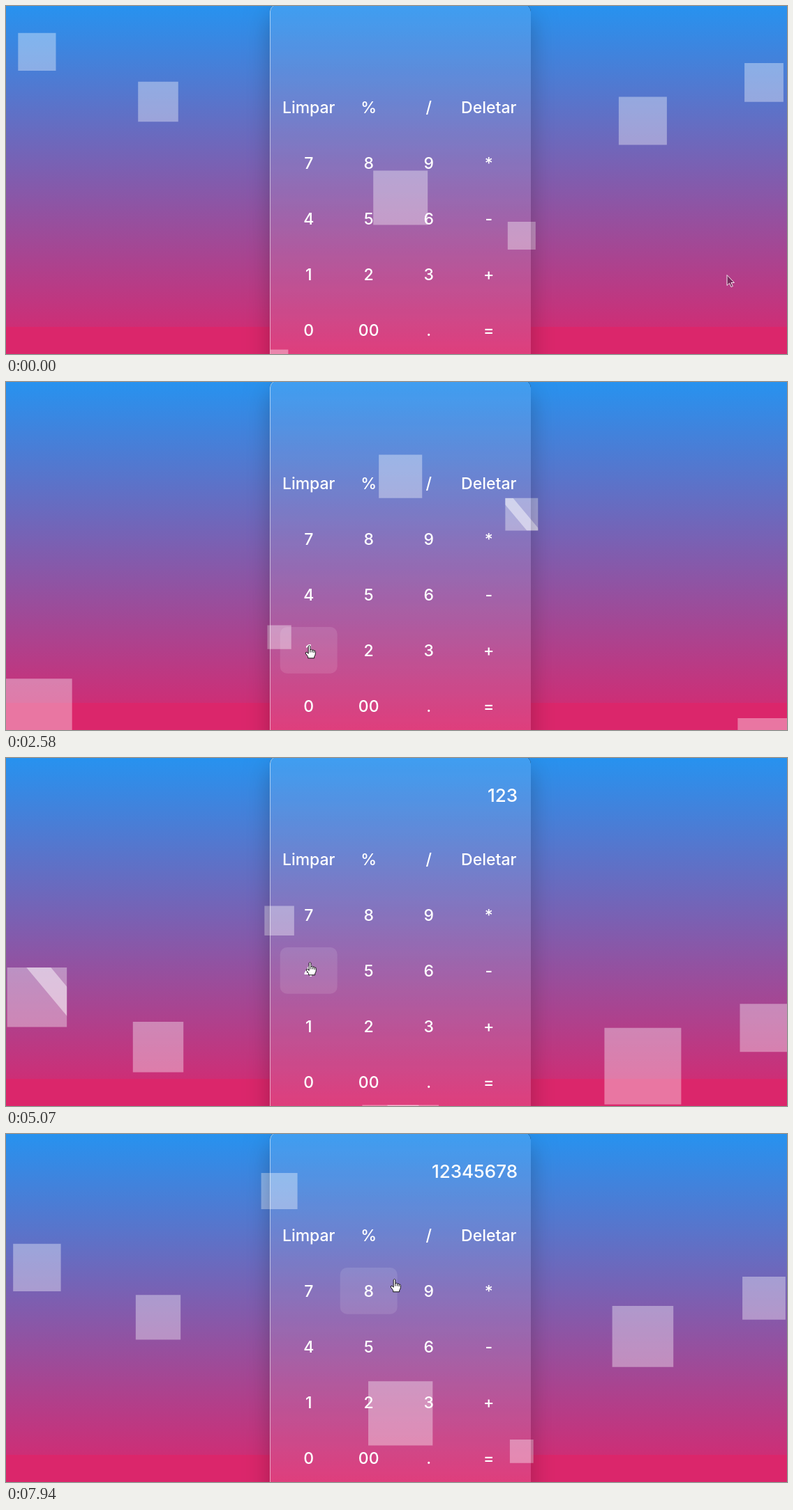
An HTML page with a canvas for the animation above (8000 ms loop, 1119x500 px).

```html
<!DOCTYPE html>
<html lang="pt">
<head>
<meta charset="utf-8">
<title>Calculadora</title>
<style>
  html, body { margin: 0; width: 100%; height: 100%; overflow: hidden; background: #2792ef; }
  canvas { display: block; }
</style>
</head>
<body>
<canvas id="stage" width="1119" height="500"></canvas>
<script>
const W = 1119, H = 500, LOOP = 8000;
const g = document.getElementById('stage').getContext('2d');
const FONT = 'Inter, "Open Sans", sans-serif';
const white = a => `rgba(255,255,255,${a})`;
const mod = (a, n) => ((a % n) + n) % n;
const clamp = k => Math.min(1, Math.max(0, k));
const ease = k => k * k * (3 - 2 * k);
const mix = (a, b, k) => a + (b - a) * k;

// --- Floating squares ---
// rest: distance left to climb at time 0, size: width at the bottom of the climb
const SQUARES = [
  { rest: 7, size: 115.6, shine: 413 },
  { rest: 78.5, size: 82.8, shine: 2247 },
  { rest: 447.5, size: 19.2, shine: 1760 },
  { rest: 216.5, size: 115.9, shine: 413 },
  { rest: 271, size: 26.2, shine: 2200 },
  { rest: 106, size: 134.6, shine: 2247 },
  { rest: 51, size: 79.5, shine: 2854 }
];
const TRAVEL = 550.5, TOP = 59, END_SIZE = 53.4;
const SHINE_PERIOD = 4100, SHINE_SPEED = .0028, SHINE_WIDTH = .41, SHINE_LEAN = 1 / 1.2;

const climbed = t => .0542 * t - .0013 * Math.max(0, t - 3470);

function drawSquare(square, i, t) {
  const rest = mod(square.rest - climbed(t), TRAVEL);
  const size = mix(END_SIZE, square.size, rest / TRAVEL);
  g.save();
  g.translate(44.4 + 173.6 * i - size / 2, TOP + rest - size / 2);
  g.scale(size, size);
  g.beginPath();
  g.rect(0, 0, 1, 1);
  g.fillStyle = white(.37);
  g.fill();
  g.clip();
  // Diagonal glint sweeping from bottom left to top right
  g.transform(1, 0, SHINE_LEAN, 1, 0, 0);
  g.fillStyle = white(.46);
  g.fillRect(SHINE_SPEED * mod(t - square.shine, SHINE_PERIOD) - 1.24, 0, SHINE_WIDTH, 1);
  g.restore();
}

// --- Pointer: waits at each stop, then glides to reach the next one on time ---
const stop = (time, x, y, digit) => ({ time, x, y, digit });
const STOPS = [
  stop(500, 1033, 386),
  stop(1360, 615, 160),
  stop(1630, 525, 204),
  stop(2520, 433, 378, '1'),
  stop(3470, 527, 372, '2'),
  stop(4120, 606, 376, '3'),
  stop(5070, 434, 293, '4'),
  stop(5620, 522, 302, '5'),
  stop(6280, 608, 311, '6'),
  stop(7040, 423, 206, '7'),
  stop(7520, 520, 208, '8'),
  stop(7940, 555, 208)
];
const PRESS_DELAY = 130, PAUSE = 150;

function pointerAt(t) {
  const next = STOPS.findIndex(s => s.time > t);
  if (next < 1) return next ? STOPS.at(-1) : STOPS[0];
  const a = STOPS[next - 1], b = STOPS[next];
  const leave = a.time + PAUSE;
  const k = ease(clamp((t - leave) / (b.time - leave)));
  return { x: mix(a.x, b.x, k), y: mix(a.y, b.y, k) };
}

const arrow = new Path2D('M0 0V15L3.5 11.8 6 17.2 8.4 16.1 6 11H10.5Z');
const hand = new Path2D('M-1.3 1Q0-1 1.4 1V6.2Q3 5 4.2 6.7 5.6 5.8 6.6 7.5 8.6 6.8 8.8 9V12' +
  'Q8.6 14.5 7.2 16V18.3H-1.8V16.2L-5.2 11.6Q-5.6 9.4-3.6 9.7L-1.3 11.8Z');
const knuckles = new Path2D('M1.4 6V10M4.2 7V10M6.6 8V10.5');

function drawPointer(t) {
  const { x, y } = pointerAt(t);
  const onKeys = x > 393 && x < 733 && y > 112;
  const shape = onKeys ? hand : arrow;
  g.save();
  g.translate(x + (onKeys ? 1.5 : 0), y + .5);
  g.lineJoin = 'round';
  g.lineWidth = 1;
  g.fillStyle = onKeys ? '#fff' : 'rgba(40,20,40,.45)';
  g.strokeStyle = onKeys ? '#111' : '#f4e6ee';
  g.fill(shape);
  g.stroke(shape);
  if (onKeys) g.stroke(knuckles);
  g.restore();
}

// --- Background and calculator ---
const backdrop = g.createLinearGradient(0, 0, 0, H);
backdrop.addColorStop(0, 'rgb(39,146,239)');
backdrop.addColorStop(1, 'rgb(219,38,108)');

const panel = new Path2D();
panel.roundRect(378, -2, 374, 540, 10);
const outside = new Path2D(panel);
outside.rect(-50, -50, W + 100, H + 100);

function drawOutside(paint) {
  g.save();
  g.clip(outside, 'evenodd');
  paint();
  g.restore();
}

function drawBackdrop() {
  g.fillStyle = backdrop;
  g.fillRect(0, 0, W, H);
  drawOutside(() => {
    g.fillStyle = 'rgb(219,38,107)';
    g.fillRect(0, 461, W, 39);
  });
}

function drawPanel() {
  drawOutside(() => {
    g.shadowColor = 'rgba(0,0,0,.25)';
    g.shadowBlur = 35;
    g.shadowOffsetY = 15;
    g.fillStyle = '#000';
    g.fill(panel);
  });
  g.fillStyle = white(.11);
  g.fill(panel);
  g.strokeStyle = white(.5);
  g.lineWidth = 1;
  g.stroke(new Path2D('M378.5 500V8Q379 2 384-1'));
}

const KEYS = [
  ['Limpar', '%', '/', 'Deletar'],
  ['7', '8', '9', '*'],
  ['4', '5', '6', '-'],
  ['1', '2', '3', '+'],
  ['0', '00', '.', '=']
];

// Share of the last 210 ms that the pointer spent on a key
function hover(trail, x, y) {
  const hits = trail.filter(p => Math.abs(p.x - x) < 41 && Math.abs(p.y - y) < 33.3);
  return hits.length / trail.length;
}

function drawKeys(t) {
  const trail = Array.from({ length: 21 }, (_, k) => pointerAt(t - 10 * k));
  g.font = '500 23px ' + FONT;
  g.textAlign = 'center';
  KEYS.forEach((row, r) => row.forEach((label, c) => {
    const x = 433.7 + 86 * c, y = 145.4 + 80 * r;
    g.beginPath();
    g.roundRect(x - 41, y - 33.3, 82, 66.6, 10);
    g.fillStyle = white(.11 * hover(trail, x, y));
    g.fill();
    g.fillStyle = '#fff';
    g.fillText(label, x, y + 8.2);
  }));
}

function drawDisplay(t) {
  const typed = STOPS.filter(s => s.digit && s.time + PRESS_DELAY <= t);
  g.font = '500 26px ' + FONT;
  g.textAlign = 'right';
  g.fillStyle = '#fff';
  g.fillText(typed.map(s => s.digit).join(''), 733, 63);
}

const start = performance.now();

function draw() {
  const t = (performance.now() - start) % LOOP;
  drawBackdrop();
  SQUARES.forEach((square, i) => drawSquare(square, i, t));
  drawPanel();
  drawKeys(t);
  drawDisplay(t);
  drawPointer(t);
  requestAnimationFrame(draw);
}
draw();
</script>
</body>
</html>
```
